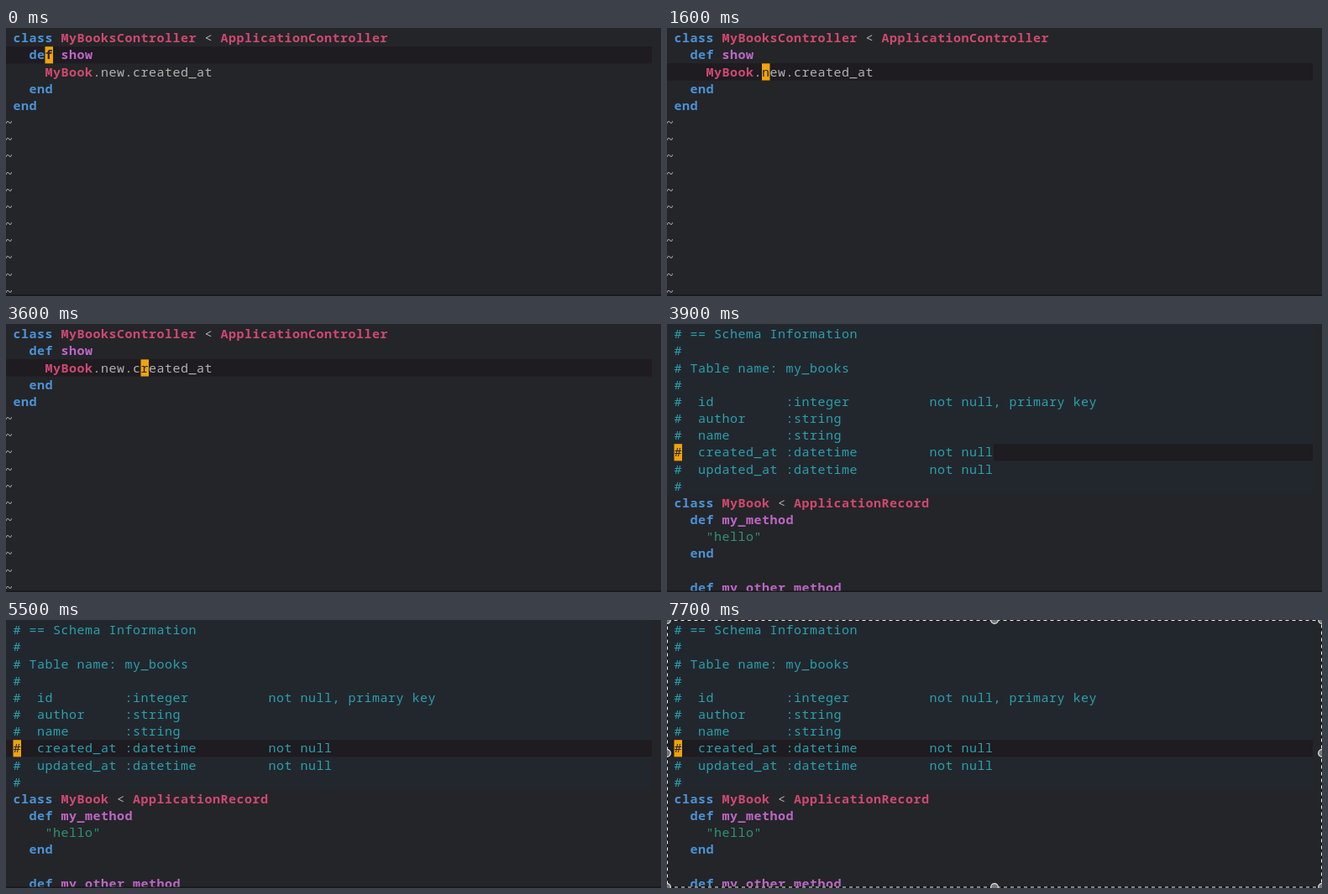
Recreate the animation shown at these times as an HTML page. Size 780 by 320 pixels, loop 7.8 s.

```html
<!DOCTYPE html>
<html lang="en">
<head>
<meta charset="utf-8">
<title>Editor: jump to schema column</title>
<style>
html, body { margin: 0; width: 100%; height: 100%; overflow: hidden; background: #242528; }
svg { display: block; }
text { font: 15px "Noto Sans Mono", "DejaVu Sans Mono", monospace; letter-spacing: .5px; white-space: pre; fill: #b2b2b2; }
.keyword { fill: #4a93d9; font-weight: 700; }
.type { fill: #cf4872; font-weight: 700; }
.method { fill: #be66c7; font-weight: 700; }
.string { fill: #2d9574; }
.comment { fill: #2aa1ae; }
.cursor { fill: #242528; }
</style>
</head>
<body>
<svg id="stage" width="780" height="320" viewBox="0 0 780 320"></svg>
<script>
const LOOP = 7800, COL = 9.5, ROW = 20.17, LEFT = 8.5, TOP = 2;
const JUMP = 3800, FULL_LINE = 4000, SELECT = 6100;
const stage = document.getElementById('stage');

const controller = `class MyBooksController < ApplicationController
  def show
    MyBook.new.created_at
  end
end`.split('\n');

const model = `# == Schema Information
#
# Table name: my_books
#
#  id         :integer          not null, primary key
#  author     :string
#  name       :string
#  created_at :datetime         not null
#  updated_at :datetime         not null
#
class MyBook < ApplicationRecord
  def my_method
    "hello"
  end

  def my_other_method`.split('\n');

function add(parent, name, attrs = {}, content = '') {
  const node = document.createElementNS('http://www.w3.org/2000/svg', name);
  for (const key in attrs) node.setAttribute(key, attrs[key]);
  node.textContent = content;
  return parent.appendChild(node);
}

const set = (node, attrs) => {
  for (const key in attrs) node.setAttribute(key, attrs[key]);
};
const show = (node, on) => node.setAttribute('visibility', on ? 'visible' : 'hidden');
const xAt = col => LEFT + col * COL;
const yAt = row => TOP + row * ROW;

function write(parent, row, col, content, kind) {
  return add(parent, 'text', { x: xAt(col), y: yAt(row) + 15.2, class: kind }, content);
}

function kindOf(word, before) {
  if (word[0] === '#') return 'comment';
  if (word[0] === '"') return 'string';
  if (/^(class|def|end)$/.test(word)) return 'keyword';
  if (/def $/.test(before)) return 'method';
  return /^[A-Z]/.test(word) ? 'type' : 'plain';
}

function writeCode(parent, lines) {
  lines.forEach((line, row) => {
    for (const { 0: word, index } of line.matchAll(/#.*|"[^"]*"|\w+|[^\w\s]/g))
      write(parent, row, index, word, kindOf(word, line.slice(0, index)));
  });
}

add(stage, 'rect', { width: 780, height: 320, fill: '#242528' });
const commentArea = add(stage, 'rect', { width: 769, height: yAt(10), fill: '#22272e' });
const cursorLine = add(stage, 'rect', { height: 20.2, fill: '#1e1b21' });

const controllerView = add(stage, 'g');
writeCode(controllerView, controller);
for (let row = controller.length; row < 16; row++) write(controllerView, row, -1, '~', 'plain');
const modelView = add(stage, 'g');
writeCode(modelView, model);

const cursorBox = add(stage, 'rect', { width: COL, height: 20.2, fill: '#f0a30a' });
const cursorText = write(stage, 0, 0, '', 'cursor');
add(stage, 'rect', { y: 318.5, width: 780, height: 1.5, fill: '#17181b' });

// Selection frame with dashed edges and eight handles.
const selection = add(stage, 'g');
const edge = { x: .5, y: .5, width: 779, height: 318.5, fill: 'none' };
add(selection, 'rect', { ...edge, stroke: '#111' });
add(selection, 'rect', { ...edge, stroke: '#eee', 'stroke-dasharray': '4 4' });
for (const x of [0, 390, 780])
  for (const y of [0, 159, 319])
    if (x !== 390 || y !== 159)
      add(selection, 'circle', { cx: x, cy: y, r: 4.3, fill: '#777', stroke: '#e8e8e8', 'stroke-width': 1.2 });

function cursorAt(t) {
  if (t >= JUMP) return [7, 0];
  if (t < 800) return [1, 4];
  return [2, Math.min(16, Math.max(4, Math.floor(t / 100) - 5))];
}

function render(t) {
  const inModel = t >= JUMP;
  const [row, col] = cursorAt(t);
  const lineStart = inModel && t < FULL_LINE ? 389 : 0;
  show(controllerView, !inModel);
  show(modelView, inModel);
  show(commentArea, inModel);
  show(selection, t >= SELECT);
  set(cursorLine, { x: lineStart, y: yAt(row), width: 769 - lineStart });
  set(cursorBox, { x: xAt(col), y: yAt(row) });
  set(cursorText, { x: xAt(col), y: yAt(row) + 15.2 });
  cursorText.textContent = (inModel ? model : controller)[row][col];
  cursorText.style.fontWeight = row === 1 || (row === 2 && col < 10) ? 700 : 400;
}

const start = performance.now();
function tick() {
  render((performance.now() - start) % LOOP);
  requestAnimationFrame(tick);
}
tick();
</script>
</body>
</html>
```
